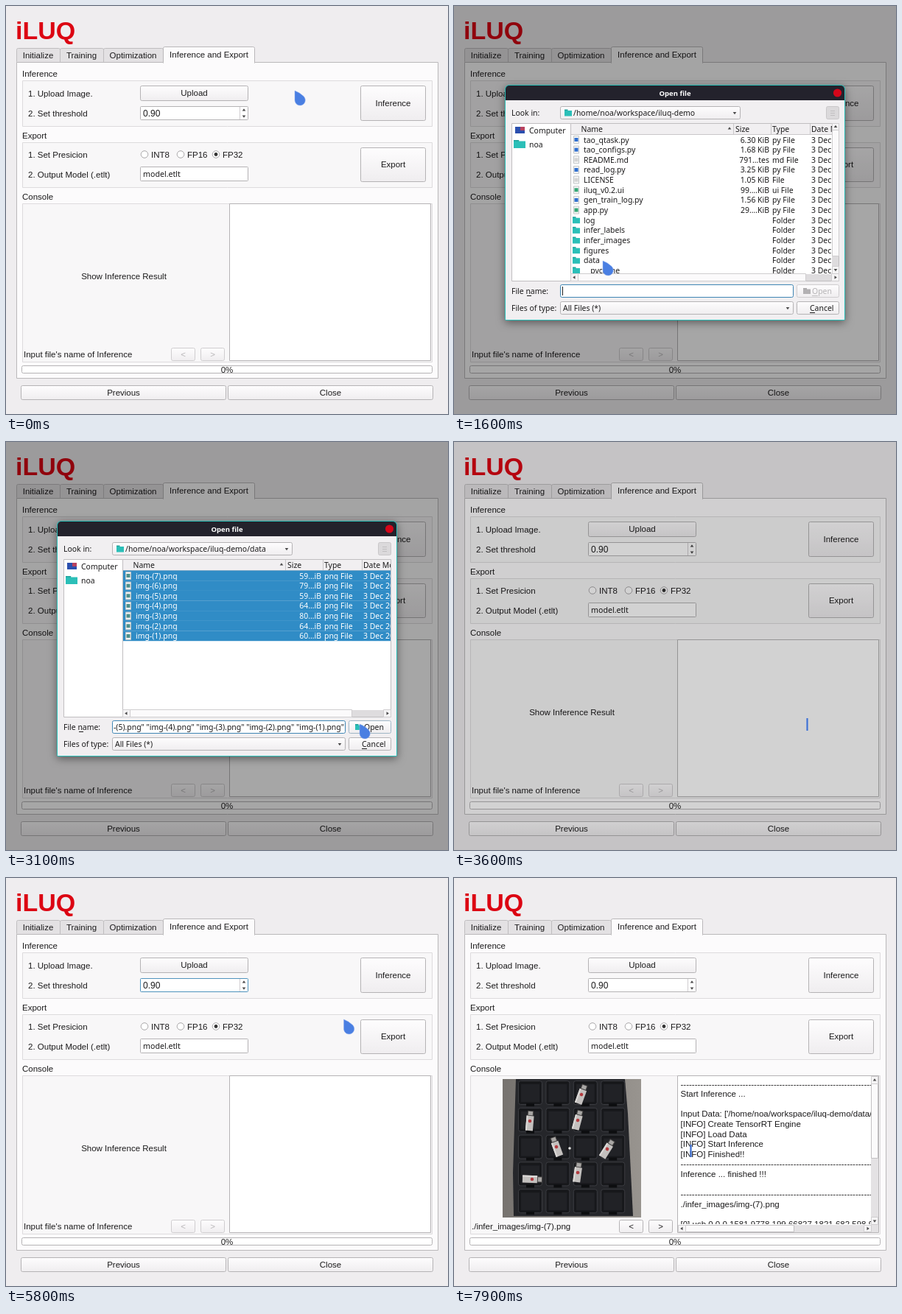
An HTML page with a canvas for the animation above (8000 ms loop, 600 by 554 pixels).

```html
<!DOCTYPE html>
<html lang="en">
<head>
<meta charset="utf-8">
<title>Inference and Export</title>
<style>
html, body { margin: 0; width: 100%; height: 100%; overflow: hidden; background: #efedef; }
canvas { display: block; }
</style>
</head>
<body>
<canvas id="stage" width="600" height="554"></canvas>
<script>
const ctx = document.getElementById('stage').getContext('2d');
const LOOP = 8000, STEP = 100;
const SANS = '"Liberation Sans", Arial, sans-serif';
const UI = '"Noto Sans", "Open Sans", sans-serif';
const APP = '11.5px ' + SANS, DLG = '10.45px ' + UI;
const INK = '#1c1b1c', TEAL = '#2bbfb8', RED = '#dc0512', BLUE = '#308cc6';
const OPEN_AT = 800, ENTER_AT = 1800, PICK_AT = 2300, ALL_AT = 2600, CLOSE_AT = 3500;
const FOCUS_AT = 4200, RUN_AT = 5200, RESULT_AT = 6300;

// time, x, y of the pointer's tip
const PATH = [
  [0, 392, 115], [500, 257, 117], [900, 257, 117], [1500, 202, 346], [1900, 202, 346],
  [2300, 190, 176], [2400, 190, 176], [2600, 192, 256], [2700, 192, 256], [3100, 480, 383],
  [3600, 480, 383], [4200, 290, 140], [4400, 290, 140], [4900, 494, 129], [5500, 494, 129],
  [6400, 357, 372], [6900, 357, 372], [7400, 322, 370]
];

const FILES = [
  ['tao_qtask.py', '6.30 KiB', 'py File', '#2f6fd0'],
  ['tao_configs.py', '1.68 KiB', 'py File', '#2f6fd0'],
  ['README.md', '791…tes', 'md File', '#d4d4d4'],
  ['read_log.py', '3.25 KiB', 'py File', '#2f6fd0'],
  ['LICENSE', '1.05 KiB', 'File', '#d4d4d4'],
  ['iluq_v0.2.ui', '99.…KiB', 'ui File', '#35a875'],
  ['gen_train_log.py', '1.56 KiB', 'py File', '#2f6fd0'],
  ['app.py', '29.…KiB', 'py File', '#35a875'],
  ...['log', 'infer_labels', 'infer_images', 'figures', 'data', '__pycache__'].map(n => [n, '', 'Folder', ''])
];
const IMAGES = ['59', '79', '59', '64', '80', '64', '60']
  .map((kb, i) => [`img-(${7 - i}).png`, kb + '…iB', 'png File', '#4d8f8a']);

const RULE = '-'.repeat(90);
const LOG = [
  RULE, 'Start Inference ...', '',
  "Input Data: ['/home/noa/workspace/iluq-demo/data/img-(7).png']",
  '[INFO] Create TensorRT Engine', '[INFO] Load Data', '[INFO] Start Inference', '[INFO] Finished!!',
  RULE, 'Inference ... finished !!!', '', RULE, './infer_images/img-(7).png', '',
  ...[
    '1581.9778 199.66827 1821.682 598.9', '2123.241 1315.6097 2411.124 1762.0',
    '766.352 2143.6797 848.4061 2268.32', '511.90414 2175.3813 657.8161 2238.',
    '1053.0181 1246.8262 1230.9293 1753', '576.0326 781.5545 642.877 999.0870',
    '549.8407 856.6028 676.4985 1173.36', '2067.6829 529.5719 2524.5305 607.4',
    '1550.6482 877.03253 1686.5106 1144', '1645.8088 1816.7495 1779.5782 2240'
  ].map((box, i) => `[${i}] usb 0 0 0 ${box}`)
];

const clamp = v => v < 0 ? 0 : v > 1 ? 1 : v;
const ramp = (t, a, b) => clamp((t - a) / (b - a));
const ease = k => k * k * (3 - 2 * k);

function fill(x, y, w, h, color) {
  ctx.fillStyle = color;
  ctx.fillRect(x, y, w, h);
}

function box(x, y, w, h, bg, edge, r = 0) {
  ctx.beginPath();
  ctx.roundRect(x + .5, y + .5, w - 1, h - 1, r);
  ctx.fillStyle = bg;
  ctx.fill();
  ctx.strokeStyle = edge;
  ctx.lineWidth = 1;
  ctx.stroke();
}

// y is the middle of the capitals
function text(s, x, y, font = APP, color = INK, align = 'left') {
  ctx.font = font;
  ctx.fillStyle = color;
  ctx.textAlign = align;
  ctx.fillText(s, x, y + 4);
}

function clipped(x, y, w, h, draw) {
  ctx.save();
  ctx.beginPath();
  ctx.rect(x, y, w, h);
  ctx.clip();
  draw();
  ctx.restore();
}

function poly(points, color) {
  ctx.beginPath();
  points.forEach(p => ctx.lineTo(p[0], p[1]));
  ctx.fillStyle = color;
  ctx.fill();
}

function arrow(x, y, dx, dy, color = '#4a494a', s = 2.3) {
  poly([[x + dx * s, y + dy * s], [x - dx + dy * s, y - dy + dx * s], [x - dx - dy * s, y - dy - dx * s]], color);
}

function button(x, y, w, h, label, { font = APP, color = INK, down = false, edge = '#b5b3b5' } = {}) {
  const g = ctx.createLinearGradient(0, y, 0, y + h);
  g.addColorStop(0, down ? '#d3d1d3' : '#fefdfe');
  g.addColorStop(1, down ? '#dcdadc' : '#efedef');
  box(x, y, w, h, g, edge, 2);
  text(label, x + w / 2, y + h / 2 - .3, font, color, 'center');
}

function folder(x, y, w, h) {
  fill(x, y, w * .45, 3, '#1fa39c');
  fill(x, y + 1.5, w, h - 1.5, TEAL);
}

function tabs() {
  [['Initialize', 14, 60], ['Training', 73, 60], ['Optimization', 132, 82]].forEach(([s, x, w]) => {
    box(x, 57, w, 21, '#e3e1e3', '#bfbdbf', 2);
    text(s, x + w / 2 - .5, 67, APP, INK, 'center');
  });
  box(14, 76, 573, 430, '#fcfbfc', '#bab8ba');
  box(213, 55, 125, 24, '#fcfbfc', '#bab8ba', 2);
  fill(214, 77, 123, 4, '#fcfbfc');
  text('Inference and Export', 275.5, 66, APP, INK, 'center');
}

function radio(x, label, on) {
  ctx.beginPath();
  ctx.arc(x, 201.5, 4.8, 0, 7);
  ctx.fillStyle = '#fff';
  ctx.fill();
  ctx.strokeStyle = '#a9a7a9';
  ctx.lineWidth = 1;
  ctx.stroke();
  if (on) {
    ctx.beginPath();
    ctx.arc(x, 201.5, 2.4, 0, 7);
    ctx.fillStyle = '#333';
    ctx.fill();
  }
  text(label, x + 9, 202);
}

function stick(x, y, deg) {
  ctx.save();
  ctx.translate(x, y);
  ctx.rotate(deg * Math.PI / 180);
  fill(-4, -14, 8, 7, '#4b4948');
  fill(-3, -13, 6, 5, '#a9a7a5');
  fill(-5, -7, 10, 20, '#c3c0be');
  fill(-5, -7, 2, 20, '#dddad8');
  ctx.beginPath();
  ctx.arc(0, 0, 2.3, 0, 7);
  ctx.fillStyle = '#b23a3e';
  ctx.fill();
  ctx.restore();
}

function photo() {
  clipped(66, 273, 188, 188, () => {
    const g = ctx.createLinearGradient(66, 0, 254, 0);
    g.addColorStop(0, '#77736f');
    g.addColorStop(1, '#98948f');
    ctx.fillStyle = g;
    ctx.fillRect(66, 273, 188, 188);
    poly([[84, 273], [232, 273], [236, 320], [243, 459], [81, 459], [80, 400]], '#25262a');
    for (let r = 0; r < 5; r++) for (let c = 0; c < 4; c++) {
      const x = 87 + c * 37.4, y = 275 + r * 36.8;
      box(x, y, 33, 33, '#17181b', '#3b3c41', 3);
      fill(x + 4, y + 5, 25, 24, '#212226');
      fill(x + 11, y + 31, 11, 4, '#0d0e10');
    }
    stick(173, 294, 20);
    stick(103, 330, 5);
    stick(168, 329, 15);
    stick(139, 365, -20);
    stick(208, 368, 32);
    stick(168, 400, 8);
    stick(106, 409, 92);
    ctx.beginPath();
    ctx.arc(157, 367, 1.8, 0, 7);
    ctx.fillStyle = '#e6e6e4';
    ctx.fill();
  });
}

function results(scroll) {
  photo();
  clipped(305, 270, 261, 200, () => {
    LOG.forEach((s, i) => text(s, 307.5, 279.6 + i * 13.6 - scroll * 152.5));
  });
  fill(566, 270, 10, 201, '#e4e2e4');
  box(566, 279 + scroll * 80, 10, 102, '#fbfafb', '#c3c1c3');
  box(566, 269, 10, 11, '#f5f4f5', '#d0ced0');
  box(566, 460, 10, 11, '#f5f4f5', '#d0ced0');
  arrow(571, 274.5, 0, -1);
  arrow(571, 465.5, 0, 1);
  fill(305, 471, 271, 10, '#e4e2e4');
  box(314, 471, 148, 10, '#fbfafb', '#c3c1c3');
  box(304, 471, 11, 10, '#f5f4f5', '#d0ced0');
  box(556, 471, 11, 10, '#f5f4f5', '#d0ced0');
  arrow(309.5, 476, -1, 0);
  arrow(561.5, 476, 1, 0);
}

function app(t) {
  fill(0, 0, 600, 554, '#efedef');
  ctx.font = 'bold 34px ' + SANS;
  ctx.fillStyle = RED;
  ctx.textAlign = 'left';
  ctx.fillText('iLUQ', 13, 45);
  tabs();

  [['Inference', 92, 101, 63], ['Export', 176, 185, 62], ['Console', 258.5, 268, 216]].forEach(([s, ly, y, h]) => {
    text(s, 22, ly);
    box(22, y, 557, h, '#f8f7f8', '#dddbdd');
  });

  text('1. Upload Image.', 30, 118.5);
  text('2. Set threshold', 30, 145.5);
  button(182, 108, 147, 21, 'Upload', { down: t >= 600 && t < 800 });
  const focus = t >= FOCUS_AT && t < RESULT_AT;
  box(182, 136, 147, 19, '#fff', focus ? '#4f93bd' : '#b5b3b5', 1);
  fill(317, 137, 1, 17, '#cfcdcf');
  arrow(323, 141.5, 0, -1);
  arrow(323, 149.5, 0, 1);
  text('0.90', 186, 145.5, '12px ' + SANS);
  button(481, 108, 89, 48, 'Inference', { down: t >= RUN_AT && t < RUN_AT + 200 });

  text('1. Set Presicion', 30, 202);
  text('2. Output Model (.etlt)', 30, 228.5);
  radio(188, 'INT8', false);
  radio(237, 'FP16', false);
  radio(285, 'FP32', true);
  box(182, 218, 147, 20, '#fff', '#b5b3b5', 1);
  text('model.etlt', 186, 228, '10.65px ' + UI);
  button(481, 192, 89, 47, 'Export');

  const done = t >= RESULT_AT;
  box(303, 268, 274, 214, '#fff', '#b5b3b5');
  if (done) results(1 - ease(ramp(t, 6800, 7500)));
  else text('Show Inference Result', 160, 367, APP, INK, 'center');
  text(done ? './infer_images/img-(7).png' : "Input file's name of Inference", 24, 473);
  const color = done ? INK : '#b7b5b7', edge = done ? '#b5b3b5' : '#cfcdcf';
  button(224, 464, 33, 18, '<', { color, edge });
  button(264, 464, 33, 18, '>', { color, edge });

  box(21, 488, 558, 11, '#fff', '#b5b3b5', 2);
  text('0%', 300, 493.5, APP, INK, 'center');
  button(20, 515, 279, 20, 'Previous');
  button(301, 515, 279, 20, 'Close');
}

function fileRow([name, size, type, tint], i, picked, right) {
  const y = 181.5 + i * 13.65, color = picked ? '#fff' : INK;
  if (picked) fill(159, y - 7, right - 159, 13.8, BLUE);
  if (!tint) folder(161, y - 4.5, 10, 9);
  else {
    box(162, y - 5.5, 8, 11, '#f6f6f6', '#c2c6c8');
    fill(163.5, y - 2.5, 5, 5, tint);
  }
  text(name, 176, y, DLG, color);
  text(size, 428, y, DLG, color, 'right');
  text(type, 432, y, DLG, color);
  text('3 Dec 2021', 485, y, DLG, color);
}

function fileTable(t) {
  const inside = t >= ENTER_AT, right = inside ? 522 : 513;
  box(158, 159, 365, 215, '#fff', '#c0bec0');
  clipped(159, 160, right - 159, 203, () => {
    fill(159, 160, 364, 14, '#f1eff1');
    fill(159, 174, 364, 1, '#c9c7c9');
    [['Name', 172.5], ['Size', 382], ['Type', 432], ['Date Modified', 485]].forEach(([s, x]) => text(s, x, 167, DLG));
    [379, 430, 483].forEach(x => fill(x, 160, 1, 14, '#c9c7c9'));
    arrow(374, 166.5, 0, -1);
    (inside ? IMAGES : FILES).forEach((f, i) => {
      const picked = inside ? t >= ALL_AT || (t >= PICK_AT && i === 0) : t >= 1700 && i === 12;
      fileRow(f, i, picked, right);
    });
  });
  if (!inside) {
    fill(513, 160, 9, 203, '#dedcde');
    box(513, 159, 10, 10, '#f5f4f5', '#d0ced0');
    box(513, 168, 10, 172, '#fbfafb', '#cfcdcf');
    box(513, 353, 10, 11, '#f5f4f5', '#d0ced0');
    arrow(518, 164, 0, -1);
    arrow(518, 358, 0, 1);
  }
  const end = inside ? 470 : 478;
  fill(159, 364, 363, 9, '#dedcde');
  box(168, 363, end - 168, 11, '#fbfafb', '#cfcdcf');
  box(158, 363, 11, 11, '#f5f4f5', '#d0ced0');
  box(512, 363, 11, 11, '#f5f4f5', '#d0ced0');
  arrow(163.5, 368.5, -1, 0);
  arrow(517.5, 368.5, 1, 0);
}

function dialog(t) {
  ctx.save();
  ctx.shadowColor = 'rgba(0,0,0,.45)';
  ctx.shadowBlur = 12;
  ctx.shadowOffsetY = 3;
  ctx.beginPath();
  ctx.roundRect(69, 107, 462, 320, [6, 6, 2, 2]);
  ctx.fillStyle = TEAL;
  ctx.fill();
  ctx.restore();
  ctx.beginPath();
  ctx.roundRect(70, 108, 460, 318, [5, 5, 1, 1]);
  ctx.fillStyle = '#23222c';
  ctx.fill();
  fill(70, 128, 460, 298, '#f1eff1');
  text('Open file', 300, 118, 'bold 9.5px ' + UI, '#fff', 'center');
  ctx.beginPath();
  ctx.arc(520.5, 118, 5.6, 0, 7);
  ctx.fillStyle = '#d4061a';
  ctx.fill();

  const inside = t >= ENTER_AT;
  text('Look in:', 78, 145, DLG);
  button(144, 136, 245, 18, '');
  folder(150, 140.5, 10, 9);
  text('/home/noa/workspace/iluq-demo' + (inside ? '/data' : ''), 162, 145, DLG);
  arrow(381, 145, 0, 1);
  box(505, 136, 18, 18, '#dbd9db', '#c9c7c9', 2);
  for (let i = 0; i < 3; i++) fill(511, 142 + i * 3, 6, 1, '#c0bec0');

  box(78, 159, 81, 215, '#fff', '#c0bec0');
  fill(83, 164, 13, 9, '#2b4fae');
  fill(90, 164, 6, 5, '#b8425f');
  text('Computer', 102, 169, DLG);
  folder(81, 182, 16, 11);
  text('noa', 102, 187.5, DLG);
  fileTable(t);

  text('File name:', 78, 387, DLG);
  fill(99, 393, 6, 1, INK);
  box(144, 378, 317, 18, '#fff', '#3f86b4', 2);
  clipped(146, 379, 313, 16, () => {
    if (t >= ALL_AT) text(IMAGES.map(f => `"${f[0]}"`).join(' '), 459, 387, DLG, INK, 'right');
    else if (t >= PICK_AT) text(IMAGES[0][0], 147, 387, DLG);
    else if (t >= 1700 && !inside) text('data', 147, 387, DLG);
    else fill(147, 381, 1, 12, '#222');
  });
  const ready = t >= PICK_AT || (t >= 1700 && !inside);
  button(465, 378, 58, 18, '', { down: t >= 3300, edge: ready ? '#9fb6c6' : '#cfcdcf' });
  if (ready) folder(474, 383, 10, 8);
  else {
    fill(474, 383, 5, 3, '#aaa8aa');
    fill(474, 384.5, 10, 6.5, '#b3b1b3');
  }
  text('Open', 486, 387, DLG, ready ? INK : '#b7b5b7');
  fill(486, 393, 8, 1, ready ? INK : '#c3c1c3');

  text('Files of type:', 78, 410, DLG);
  button(144, 401, 317, 18, '');
  text('All Files (*)', 148, 410, DLG);
  arrow(453, 410, 0, 1);
  button(465, 401, 58, 18, '');
  text('Cancel', 483, 410, DLG);
  fill(483, 416, 7, 1, INK);
}

function pointer(t) {
  let i = PATH.findIndex(p => p[0] > t);
  if (i < 0) i = PATH.length;
  const a = PATH[i - 1], b = PATH[i] || a;
  const k = a === b ? 0 : ease(ramp(t, a[0], b[0]));
  const x = a[1] + (b[1] - a[1]) * k, y = a[2] + (b[2] - a[2]) * k;
  const modal = t >= OPEN_AT && t < CLOSE_AT;
  if (!modal && x > 304 && x < 566 && y > 269 && y < 470) {
    fill(x - 2, y - 8, 3, 17, 'rgba(90,135,225,.75)');
    fill(x - 1, y - 8, 1, 17, '#3f6fcb');
    return;
  }
  ctx.beginPath();
  ctx.moveTo(x, y);
  ctx.quadraticCurveTo(x + 6, y + 2, x + 12, y + 7.5);
  ctx.bezierCurveTo(x + 17, y + 13, x + 13, y + 20, x + 7.3, y + 20);
  ctx.bezierCurveTo(x + 3, y + 20, x, y + 16.5, x, y + 12.5);
  ctx.closePath();
  ctx.fillStyle = '#4a7fe2';
  ctx.fill();
  ctx.strokeStyle = 'rgba(150,180,240,.6)';
  ctx.lineWidth = .8;
  ctx.stroke();
}

function draw(t) {
  app(t);
  const dim = t < OPEN_AT ? 0
    : t < CLOSE_AT ? .1 + .25 * ramp(t, OPEN_AT, 1100)
    : .35 * (1 - ramp(t, CLOSE_AT - 100, 3800));
  if (dim) fill(0, 0, 600, 554, `rgba(0,0,0,${dim})`);
  if (t >= OPEN_AT && t < CLOSE_AT) dialog(t);
  pointer(t);
}

const start = performance.now();
function tick() {
  const t = (performance.now() - start) % LOOP;
  draw(Math.floor(t / STEP) * STEP);
  requestAnimationFrame(tick);
}
tick();
</script>
</body>
</html>
```
